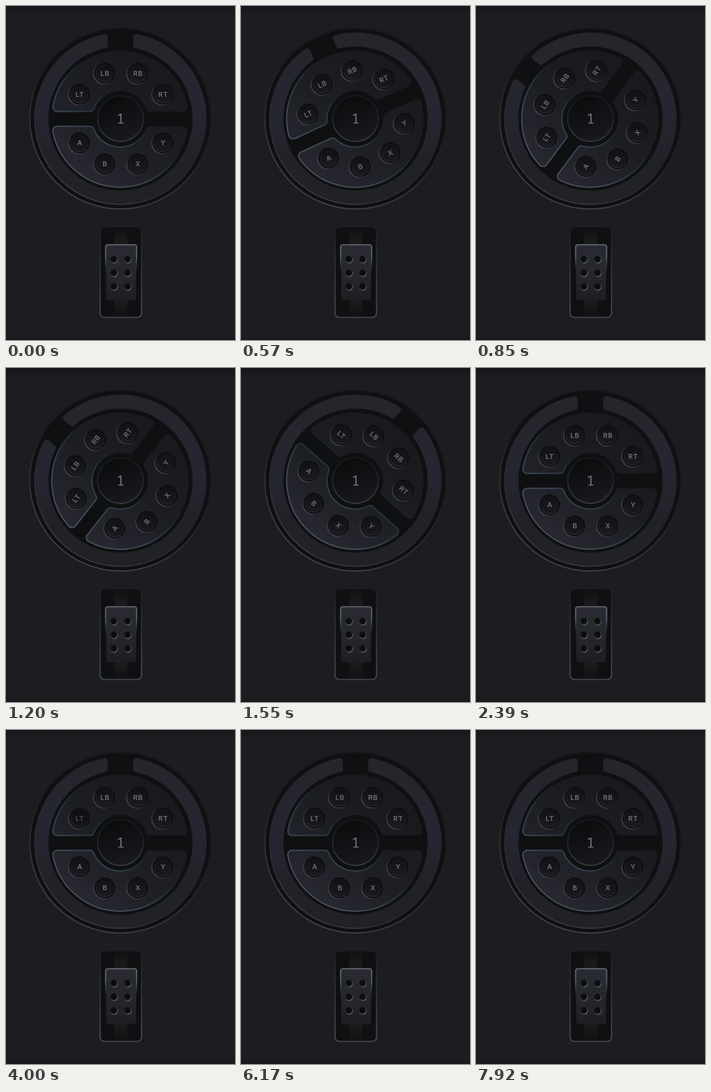
Recreate the animation shown at these times as an HTML page. Size 370 by 540 pixels, loop 7990 ms.

```html
<!DOCTYPE html>
<html lang="en">
<head>
<meta charset="utf-8">
<title>Dial controller</title>
<style>
  html, body { margin: 0; width: 100%; height: 100%; overflow: hidden; background: #1b1d21; }
  svg { display: block; width: 370px; height: 540px; }
  text { text-anchor: middle; }
  .label { font: 600 11px Inter, "Liberation Sans", sans-serif; letter-spacing: .7px; fill: #707176; }
  .count { font: 400 22px "Noto Sans Mono", monospace; fill: #76778a; }
</style>
</head>
<body>
<svg viewBox="0 0 370 540">
  <defs>
    <linearGradient id="page" x2="0" y2="1">
      <stop stop-color="#15161a"/><stop offset=".025" stop-color="#1b1d21"/>
      <stop offset=".99" stop-color="#1b1d21"/><stop offset="1" stop-color="#17171a"/>
    </linearGradient>
    <linearGradient id="rim" gradientUnits="userSpaceOnUse" x1="50" y1="-100" x2="-50" y2="130">
      <stop offset=".3" stop-color="#17181b"/><stop offset=".7" stop-color="#303238"/>
      <stop offset="1" stop-color="#404249"/>
    </linearGradient>
    <linearGradient id="ringEdge" gradientUnits="userSpaceOnUse" x1="40" y1="-40" x2="-50" y2="130">
      <stop offset=".3" stop-color="#3c3e46" stop-opacity="0"/><stop offset="1" stop-color="#42444c"/>
    </linearGradient>
    <!-- These three keep the light still while the dial turns. -->
    <linearGradient id="ringFill" class="lit" gradientUnits="userSpaceOnUse" x1="0" y1="-139" x2="0" y2="139">
      <stop stop-color="#25262b"/><stop offset=".45" stop-color="#252631"/>
      <stop offset=".75" stop-color="#212228"/><stop offset="1" stop-color="#202225"/>
    </linearGradient>
    <linearGradient id="padFill" class="lit" gradientUnits="userSpaceOnUse" x1="60" y1="-70" x2="-60" y2="80">
      <stop stop-color="#191a1d"/><stop offset=".5" stop-color="#1d1e23"/><stop offset="1" stop-color="#26272f"/>
    </linearGradient>
    <linearGradient id="edge" class="lit" gradientUnits="userSpaceOnUse" x1="50" y1="-56" x2="-62" y2="70">
      <stop offset=".25" stop-color="#1f262c" stop-opacity="0"/><stop offset=".5" stop-color="#26323c"/>
      <stop offset=".75" stop-color="#384656"/><stop offset="1" stop-color="#4c4f5c"/>
    </linearGradient>
    <linearGradient id="hub" x1=".3" y1="0" x2=".7" y2="1">
      <stop stop-color="#0a0b0c"/><stop offset="1" stop-color="#191a1e"/>
    </linearGradient>
    <linearGradient id="hubRim" x2="0" y2="1">
      <stop stop-color="#17181b"/><stop offset=".5" stop-color="#22242a"/><stop offset="1" stop-color="#3a3b43"/>
    </linearGradient>
    <linearGradient id="well" x1=".85" y1=".1" x2=".15" y2=".85">
      <stop offset=".2" stop-color="#16171a"/><stop offset="1" stop-color="#383a45"/>
    </linearGradient>
    <linearGradient id="cap" x2="0" y2="1">
      <stop stop-color="#111215"/><stop offset="1" stop-color="#191a1d"/>
    </linearGradient>
    <linearGradient id="capRim" x1=".6" x2=".4" y2="1">
      <stop offset=".3" stop-color="#141518"/><stop offset="1" stop-color="#2b2c32"/>
    </linearGradient>
    <linearGradient id="slotRim" x2="0" y2="1">
      <stop stop-color="#1d1e22"/><stop offset=".5" stop-color="#303138"/><stop offset="1" stop-color="#42444e"/>
    </linearGradient>
    <linearGradient id="track" x2="0" y2="1">
      <stop stop-color="#17191a" stop-opacity=".2"/><stop offset=".15" stop-color="#191b1c"/>
      <stop offset=".85" stop-color="#191b1c"/><stop offset="1" stop-color="#17191a" stop-opacity=".2"/>
    </linearGradient>
    <linearGradient id="thumb" x2="0" y2="1">
      <stop stop-color="#2a2b32"/><stop offset=".6" stop-color="#25262c"/><stop offset="1" stop-color="#1d1e21"/>
    </linearGradient>
    <linearGradient id="thumbRim" x2="0" y2="1">
      <stop stop-color="#5e606a"/><stop offset=".4" stop-color="#4a5666"/>
      <stop offset=".95" stop-color="#2a343d" stop-opacity="0"/>
    </linearGradient>
    <linearGradient id="hole" x1=".1" y1="0" x2=".8" y2="1">
      <stop offset=".2" stop-color="#1c1d21"/><stop offset="1" stop-color="#5b5c64"/>
    </linearGradient>
  </defs>

  <rect width="370" height="540" fill="url(#page)"/>

  <g transform="translate(185 182)">
    <circle cx="-.3" r="146.2" fill="#0f1011" stroke="url(#rim)" stroke-width="2"/>
    <path id="ring" class="turn" fill="url(#ringFill)"/>
    <circle r="138.8" fill="none" stroke="url(#ringEdge)" stroke-width="1.4"/>
    <g transform="translate(-.6 .6)">
      <g class="turn" fill="url(#padFill)" stroke="url(#edge)" stroke-width="2">
        <path id="upper"/>
        <path id="lower"/>
      </g>
    </g>
    <g id="buttons" transform="translate(1.2 0)"></g>
    <circle r="37" fill="url(#hub)" stroke="url(#hubRim)" stroke-width="2"/>
    <text class="count" y="8">1</text>
  </g>

  <g>
    <rect x="152" y="357" width="67" height="146.5" rx="7" fill="#0f1011" stroke="url(#slotRim)" stroke-width="2.2"/>
    <rect x="175" y="359" width="21" height="142" fill="url(#track)"/>
    <rect x="162" y="386" width="48" height="90" rx="4" fill="url(#thumb)"/>
    <path d="M162.5 438Q161 420 161 410V390q0-4 4-4h42q4 0 4 4V410Q211 420 209.5 438"
      fill="none" stroke="url(#thumbRim)" stroke-width="2.2"/>
    <g id="holes"></g>
  </g>
</svg>

<script>
const LOOP = 7990, RAD = Math.PI / 180, FADE = 110;
const $ = id => document.getElementById(id);

function add(parent, tag, attrs) {
  const el = document.createElementNS('http://www.w3.org/2000/svg', tag);
  for (const k in attrs) el.setAttribute(k, attrs[k]);
  return parent.appendChild(el);
}

// Corner points of a straight edge at distance h from the centre, from outer arc to inner arc.
function edgePoints(h, R, r, q) {
  const c = h + q, uo = Math.sqrt((R - q) ** 2 - c * c), ui = Math.sqrt((r + q) ** 2 - c * c);
  const ko = R / (R - q), ki = r / (r + q);
  return [[uo * ko, c * ko], [uo, h], [ui, h], [ui * ki, c * ki]];
}

// Rounded annular segment, clockwise from edge a to edge b.
function segment(a, b, R, r, q, large) {
  const arc = (rad, big, sweep, p) => `A${rad} ${rad} 0 ${big} ${sweep} ${p}`;
  return `M${a[0]}` + arc(R, large, 1, b[0]) + arc(q, 0, 1, b[1]) + `L${b[2]}` + arc(q, 0, 1, b[3]) +
    arc(r, large, 0, a[3]) + arc(q, 0, 1, a[2]) + `L${a[1]}` + arc(q, 0, 1, a[0]) + 'Z';
}

const gap = edgePoints(20.5, 139, 116.5, 5);
$('ring').setAttribute('d', segment(gap.map(([u, h]) => [h, -u]), gap.map(([u, h]) => [-h, -u]), 139, 116.5, 5, 1));

const pad = edgePoints(12, 110.5, 45.5, 7);
const place = (sx, sy) => pad.map(([u, h]) => [sx * u, sy * h]);
$('upper').setAttribute('d', segment(place(-1, -1), place(1, -1), 110.5, 45.5, 7, 0));
$('lower').setAttribute('d', segment(place(1, 1), place(-1, 1), 110.5, 45.5, 7, 0));

for (const x of [174.8, 197]) for (const y of [410, 432, 454]) {
  add($('holes'), 'circle', { cx: x, cy: y, r: 6.4, fill: 'url(#hole)' });
  add($('holes'), 'circle', { cx: x - .5, cy: y - .6, r: 5, fill: '#0c0d0e' });
}

// Label, direction in degrees, then the spans in ms when it is held down.
const buttons = [
  ['LT', -149.7, [3070, 3290], [3770, 3990]],
  ['LB', -110, [4270, 4480], [4760, 5050], [5320, 5600], [5880, 6090]],
  ['RB', -70, [4530, 4760], [5050, 5320]],
  ['RT', -30.3, [3500, 3770]],
  ['A', 149.7],
  ['B', 110],
  ['X', 70, [7210, 7500]],
  ['Y', 30.3, [7905, 8200]]
].map(([name, dir, ...holds]) => {
  const g = add($('buttons'), 'g', {});
  add(g, 'circle', { cx: -1.2, cy: .6, r: 18, fill: 'url(#well)' });
  add(g, 'circle', { r: 16.6, fill: '#0c0d0e' });
  add(g, 'circle', { r: 14, fill: 'url(#cap)', stroke: 'url(#capRim)', 'stroke-width': 1.4 });
  const shade = add(g, 'circle', { r: 13, fill: '#0b0c0d', opacity: 0 });
  const label = add(g, 'text', { class: 'label', x: .4, y: 4 });
  label.textContent = name;
  return { g, shade, label, dir, holds };
});

const clamp = x => Math.min(1, Math.max(0, x));
const ease = x => x < .5 ? 2 * x * x : 1 - 2 * (1 - x) ** 2;

// Turns: start, length, change in degrees.
const turns = [[215, 757, -56], [1125, 570, 112], [1944, 440, -56]];
const angleAt = t => turns.reduce((sum, [s, d, by]) => sum + by * ease(clamp((t - s) / d)), 0);
const heldAt = (t, holds) => holds.reduce((sum, [on, off]) =>
  sum + clamp((t - on) / FADE) - clamp((t - off) / FADE), 0);

const turning = document.querySelectorAll('.turn');
const lights = document.querySelectorAll('.lit');

function draw(now) {
  const t = now % LOOP, a = angleAt(t);
  turning.forEach(el => el.setAttribute('transform', `rotate(${a})`));
  lights.forEach(el => el.setAttribute('gradientTransform', `rotate(${-a})`));
  for (const b of buttons) {
    const dir = (b.dir + a) * RAD, held = heldAt(t, b.holds);
    b.g.setAttribute('transform', `translate(${78 * Math.cos(dir)} ${78 * Math.sin(dir)})`);
    b.label.setAttribute('transform', `rotate(${a})`);
    b.label.setAttribute('opacity', 1 - .45 * held);
    b.shade.setAttribute('opacity', .3 * held);
  }
}

const start = performance.now();
function tick() {
  draw(performance.now() - start);
  requestAnimationFrame(tick);
}
tick();
</script>
</body>
</html>
```
